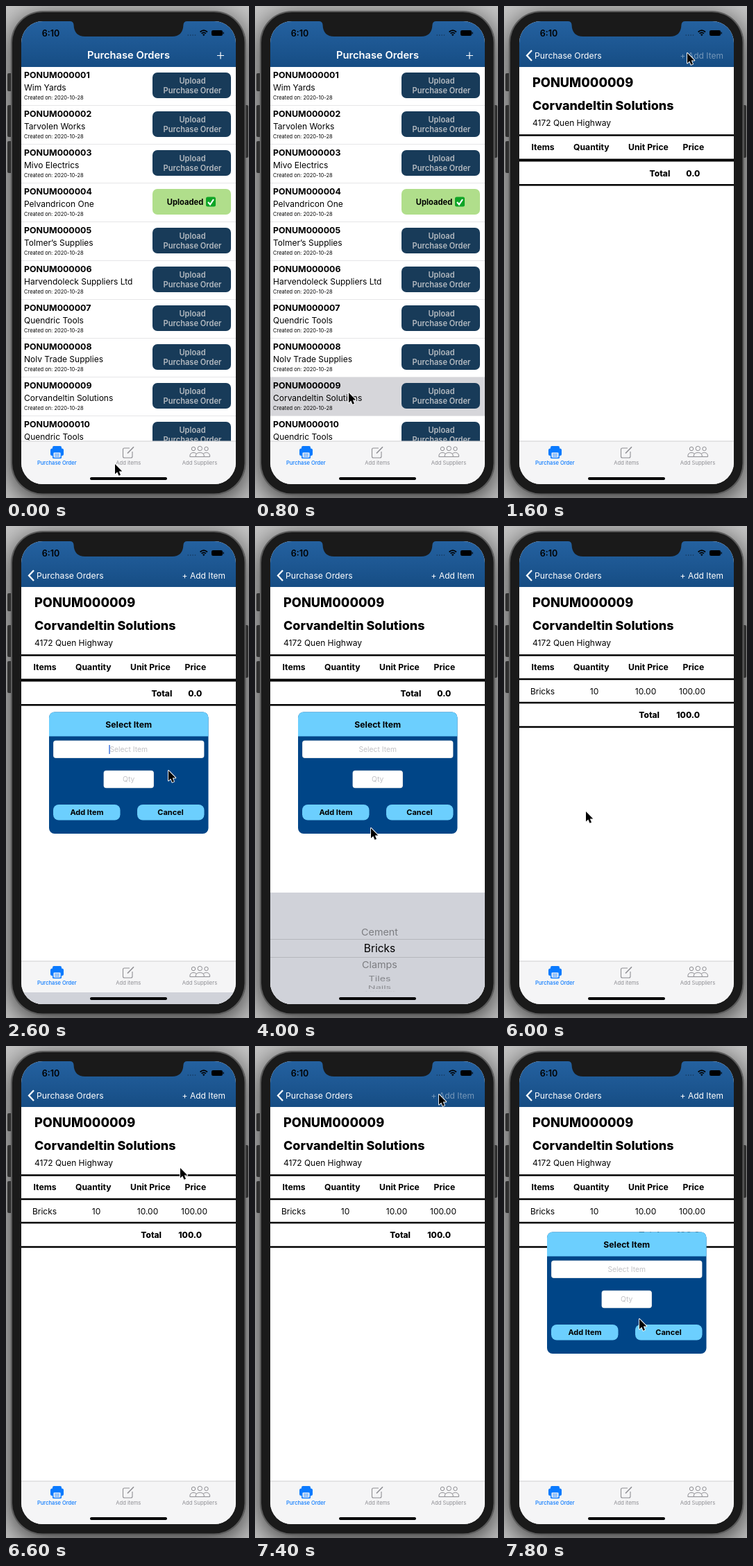
These frames come from a looping animation (350 by 710 pixels, 8 s). An HTML page with a canvas:

```html
<!DOCTYPE html>
<html lang="en">
<head>
<meta charset="utf-8">
<title>Purchase orders</title>
<style>
  html, body { margin: 0; width: 100%; height: 100%; overflow: hidden; }
  canvas { display: block; width: 350px; height: 710px; }
</style>
</head>
<body>
<canvas></canvas>
<script>
const LOOP = 8000, STEP = 200;
const NAVY = '#004587', SKY = '#6ccffe', BLUE = '#0a7aff', GRAY = '#8e8e93';
const SUPPLIERS = ['Wim Yards', 'Tarvolen Works', 'Mivo Electrics', 'Pelvandricon One', 'Tolmer’s Supplies',
  'Harvendoleck Suppliers Ltd', 'Quendric Tools', 'Nolv Trade Supplies', 'Corvandeltin Solutions', 'Quendric Tools'];
const MATERIALS = ['Cement', 'Bricks', 'Clamps', 'Tiles', 'Nails', 'Timber'];

// [time, x, y] of the pointer tip
const POINTER = [
  [0, 157, 661], [200, 152, 640], [400, 140, 590], [600, 134, 560], [1000, 136, 556],
  [1200, 190, 330], [1400, 250, 110], [1600, 264, 68], [1800, 264, 68], [2000, 258, 150],
  [2200, 235, 270], [2400, 230, 322], [2600, 234, 353], [2800, 215, 470], [3000, 195, 590],
  [3200, 184, 618], [3600, 180, 594], [3800, 180, 594], [4000, 167, 436], [4200, 172, 385],
  [4400, 178, 368], [4800, 181, 369], [5200, 181, 369], [5400, 150, 395], [5600, 118, 412],
  [6000, 118, 412], [6200, 140, 370], [6400, 195, 270], [6600, 251, 176], [6800, 262, 95],
  [7000, 265, 70], [7400, 265, 70], [7600, 245, 200], [7800, 195, 394]];

const canvas = document.querySelector('canvas');
const ctx = canvas.getContext('2d');
const ratio = window.devicePixelRatio || 1;
canvas.width = 350 * ratio;
canvas.height = 710 * ratio;

const progress = (t, from, to) => Math.min(1, Math.max(0, (t - from) / (to - from)));
const smooth = p => p * p * (3 - 2 * p);
const between = (t, from, to) => t >= from && t < to;

function rect(x, y, w, h, color, radius = 0) {
  ctx.beginPath();
  ctx.roundRect(x, y, w, h, radius);
  ctx.fillStyle = color;
  ctx.fill();
}

function text(str, x, y, size, { weight = 400, color = '#000', align = 'left' } = {}) {
  ctx.font = `${weight} ${size}px Inter, sans-serif`;
  ctx.textAlign = align;
  ctx.fillStyle = color;
  ctx.fillText(str, x, y + size * 0.363);
}

function stroke(path, color, width) {
  ctx.strokeStyle = color;
  ctx.lineWidth = width;
  ctx.stroke(new Path2D(path));
}

function group(draw, { x = 0, y = 0, alpha = 1 } = {}) {
  ctx.save();
  ctx.translate(x, y);
  ctx.globalAlpha *= alpha;
  draw();
  ctx.restore();
}

function drawPhone() {
  rect(0, 0, 350, 710, '#c6c6c6');
  ctx.save();
  ctx.shadowColor = 'rgba(0,0,0,.75)';
  ctx.shadowBlur = 38 * ratio;
  ctx.shadowOffsetY = 8 * ratio;
  rect(8, 8, 337, 697, '#222', 45);
  ctx.restore();
  for (const [x, y, h] of [[2, 97, 26], [2, 143, 46], [2, 195, 46], [342, 143, 76]])
    rect(x, y, 7, h, '#303030', 2);
  rect(7, 7, 338.5, 698.5, '#5c5c5c', 46);
  rect(9, 9, 334.5, 694.5, '#1a1a1a', 44);
}

function drawStatusBar() {
  ctx.fillStyle = '#1a1a1a';
  ctx.fill(new Path2D('M92 22 Q97 22 97.5 27 Q98 44 114 44 H239 Q255 44 255.5 27 Q256 22 261 22Z'));
  text('6:10', 64.5, 39, 12.5, { weight: 600, align: 'center' });
  for (let i = 0; i < 4; i++) rect(261.5 + i * 3.4, 41.3, 1.6, 1.6, 'rgba(0,0,0,.4)', 0.8);
  stroke('M279.6 37.5 Q284.8 32.8 290 37.5 M281.6 39.7 Q284.8 37 288 39.7', '#000', 1.7);
  ctx.fillStyle = '#000';
  ctx.fill(new Path2D('M283 41.3 Q284.8 39.9 286.6 41.3 L284.8 43.2Z'));
  rect(296, 35, 16, 8, '#000', 2.2);
  rect(312.6, 37.5, 1.2, 3, '#000', 0.5);
}

function drawNavBar(push, pressed) {
  const fill = ctx.createLinearGradient(0, 22, 0, 88);
  fill.addColorStop(0, '#2461a0');
  fill.addColorStop(1, '#164d84');
  rect(22, 22, 309, 66, fill);
  group(() => {
    text('Purchase Orders', 176.5, 71, 14.7, { weight: 600, color: '#fff', align: 'center' });
  }, { x: -85 * push, alpha: 1 - push });
  group(() => stroke('M304 71.5 h10 M309 66.5 v10', '#fff', 1.2), { alpha: 1 - push });
  group(() => {
    text('Purchase Orders', 44 + 85 * (1 - push), 71.5, 12.2, { color: '#fff' });
    stroke('M40 64 L33 71.5 L40 79', '#fff', 2.3);
    const color = pressed ? 'rgba(255,255,255,.4)' : '#fff';
    text('+ Add Item', 316, 71.5, 12, { color, align: 'right' });
  }, { alpha: push });
}

function drawList(selected) {
  rect(22, 88, 309, 540, '#fff');
  SUPPLIERS.forEach((name, i) => {
    const y = 88 + i * 56;
    if (selected && i === 8) rect(22, y, 309, 55, '#d6d6da');
    text('PONUM' + String(i + 1).padStart(6, '0'), 26, y + 11.5, 12.4, { weight: 700 });
    text(name, 26, y + 29.5, 12);
    text('Created on: 2020-10-28', 26, y + 44, 7.5);
    rect(22, y + 55, 309, 0.8, '#dedee0');
    const uploaded = i === 3;
    rect(211, y + 8, 113, 37, uploaded ? '#b0de8b' : '#183b59', 7);
    if (uploaded) {
      text('Uploaded', 258, y + 26.5, 11.2, { weight: 700, align: 'center' });
      rect(288, y + 19.5, 14, 14, '#0fa526', 2.5);
      stroke(`M291 ${y + 27} l3 3.5 l5 -7.5`, '#fff', 2.2);
    } else {
      const style = { weight: 600, color: '#b4bac0', align: 'center' };
      text('Upload', 268.5, y + 20, 11.1, style);
      text('Purchase Order', 268.5, y + 33.5, 11.1, style);
    }
  });
}

function drawDetail(hasItem) {
  const heading = { weight: 800 };
  const bold = { weight: 700 };
  const total = { weight: 800, align: 'right' };
  const centered = { align: 'center' };
  const line = (y, h = 2.4) => rect(22, y - h / 2, 309, h, '#000');
  rect(22, 88, 309, 540, '#fff');
  text('PONUM000009', 41, 110.8, 18.2, heading);
  text(SUPPLIERS[8], 41, 143.3, 17.9, heading);
  text('4172 Quen Highway', 41, 169, 12);
  line(186.5);
  text('Items', 39.5, 203.5, 12.2, bold);
  text('Quantity', 100, 203.5, 12.2, bold);
  text('Unit Price', 179, 203.5, 12.2, bold);
  text('Price', 257.5, 203.5, 12.2, bold);
  if (hasItem) {
    line(221);
    text('Bricks', 55.5, 238.5, 12, centered);
    text('10', 130, 238.5, 12, centered);
    text('10.00', 204, 238.5, 12, centered);
    text('100.00', 271, 238.5, 12, centered);
    line(255);
    text('Total', 224, 273, 12, total);
    text('100.0', 282, 273, 12, total);
    line(290);
  } else {
    line(222.5, 4);
    text('Total', 239.3, 241.2, 12, total);
    text('0.0', 282.3, 241.2, 12, total);
    line(258.2);
  }
}

function drawField(x, y, w, h, value, placeholder) {
  rect(x, y, w, h, '#c9cdd3', 4);
  rect(x + 0.5, y + 0.5, w - 1, h - 1, '#fff', 3.5);
  text(value || placeholder, 176.7, y + h / 2, 10.3, { color: value ? '#000' : '#c2c2c6', align: 'center' });
}

function drawModal({ item, quantity, caret, pressed }) {
  const centered = { weight: 700, align: 'center' };
  rect(62, 268.5, 229.5, 175.5, NAVY, 8);
  rect(62, 268.5, 229.5, 35, SKY, [8, 8, 0, 0]);
  text('Select Item', 176.7, 286.5, 12.2, centered);
  drawField(68, 309.5, 217.5, 25.5, item, 'Select Item');
  drawField(140.5, 352.8, 72.5, 25.5, quantity, 'Qty');
  if (caret === 'item') rect(148.3, 316, 1.5, 13, '#3f75dd');
  if (caret === 'quantity') rect(quantity ? 184 : 166.8, 359, 1.5, 13, '#3f75dd');
  rect(68, 402, 96.5, 22.5, SKY, 8);
  rect(189, 402, 96.5, 22.5, SKY, 8);
  text('Add Item', 116.5, 413.5, 11, { ...centered, color: pressed ? 'rgba(0,0,0,.3)' : '#000' });
  text('Cancel', 237, 413.5, 11, centered);
}

function drawTabBar() {
  rect(22, 628, 309, 62, '#f5f5f6');
  rect(22, 627.6, 309, 0.8, '#cfcfd2');
  rect(67, 635, 13, 5, BLUE, [2, 2, 0, 0]);
  rect(64, 638.5, 19, 10.5, BLUE, 2.5);
  rect(67, 643, 13, 10, BLUE, 1.5);
  rect(68.5, 644.5, 10, 7, '#f5f5f6', 0.5);
  stroke('M70 646.8 h7 M70 649.3 h7', BLUE, 1);
  stroke('M178 638 H170.5 Q168.5 638 168.5 640 V650 Q168.500 652 170.5 652 H180 Q182 652 182 650 V643', GRAY, 1.1);
  stroke('M175 645.5 L184 636.3', GRAY, 1.6);
  for (const [x, y, s] of [[270, 639, 0.85], [288.5, 639, 0.85], [279.3, 638.5, 1]]) {
    const body = new Path2D(`M${x - 6 * s} 650.5 Q${x - 6.5 * s} 644.5 ${x} 644.5 Q${x + 6.5 * s} 644.5 ${x + 6 * s} 650.5 Z`);
    ctx.fillStyle = '#f5f5f6';
    ctx.strokeStyle = GRAY;
    ctx.lineWidth = 1;
    ctx.fill(body);
    ctx.stroke(body);
    ctx.beginPath();
    ctx.arc(x, y, 3.2 * s, 0, 7);
    ctx.fill();
    ctx.stroke();
  }
  text('Purchase Order', 73.3, 659.3, 7.6, { weight: 500, color: BLUE, align: 'center' });
  text('Add items', 176.3, 659.3, 7.6, { color: GRAY, align: 'center' });
  text('Add Suppliers', 279, 659.3, 7.6, { color: GRAY, align: 'center' });
}

// Wheel rows lie on a cylinder seen from the front.
function drawPicker(selection) {
  const radius = 62, angle = 0.388;
  rect(22, 529, 309, 161, '#d0d2d9');
  MATERIALS.forEach((name, i) => {
    const offset = i - selection, turn = offset * angle;
    if (Math.abs(turn) >= Math.PI / 2) return;
    const near = Math.max(0, 1 - Math.abs(offset));
    ctx.save();
    ctx.translate(179.5, 609.5 + radius * Math.sin(turn));
    ctx.scale(1, Math.cos(turn));
    ctx.globalAlpha = near > 0.5 ? 1 : 0.45 - Math.abs(offset) * 0.04;
    text(name, 0, 0, 14.3 + 1.2 * near, { align: 'center' });
    ctx.restore();
  });
  rect(22, 596, 309, 0.8, '#acaeb4');
  rect(22, 622.3, 309, 0.8, '#acaeb4');
}

function drawPointer(t) {
  const next = POINTER.findIndex(key => key[0] > t);
  const end = POINTER.at(next), start = next < 0 ? end : POINTER[next - 1];
  const p = next < 0 ? 0 : progress(t, start[0], end[0]);
  group(() => {
    const arrow = new Path2D('M0 0 V14.5 L3.3 11.5 L5.5 16.8 L8 15.7 L5.8 10.5 H10.3 Z');
    ctx.lineJoin = 'round';
    ctx.strokeStyle = '#fff';
    ctx.lineWidth = 1.8;
    ctx.stroke(arrow);
    ctx.fillStyle = '#000';
    ctx.fill(arrow);
  }, { x: start[1] + (end[1] - start[1]) * p, y: start[2] + (end[2] - start[2]) * p });
}

function caretAt(t) {
  if (between(t, 2400, 3800)) return Math.floor((t - 2400) / 600) % 2 ? '' : 'item';
  if (between(t, 4400, 5600)) return 'quantity';
  return '';
}

function render(t) {
  const push = smooth(progress(t, 900, 1400));
  const rise = 1 - (1 - progress(t, 2577, 3000)) ** 2;
  const pickerY = 161 * (1 - rise) + 161 * smooth(progress(t, 4400, 4750));

  ctx.setTransform(ratio, 0, 0, ratio, 0, 0);
  drawPhone();
  ctx.save();
  ctx.beginPath();
  ctx.roundRect(22, 22, 309, 668, 31);
  ctx.clip();
  rect(22, 22, 309, 668, '#fff');
  if (push < 1) group(() => drawList(between(t, 600, 1400)), { x: -100 * push });
  if (push > 0) group(() => drawDetail(t >= 6000), { x: 309 * (1 - push) });
  drawNavBar(push, between(t, 1600, 2000) || between(t, 7400, 7600));
  drawStatusBar();
  if (between(t, 2000, 6000) || t >= 7600) {
    const filling = between(t, 4400, 6000);
    drawModal({
      item: filling ? 'Bricks' : '',
      quantity: filling ? '10'.slice(0, Math.max(0, (t - 5000) / STEP)) : '',
      caret: caretAt(t),
      pressed: t === 5800,
    });
  }
  drawTabBar();
  if (pickerY < 161) group(() => drawPicker(smooth(progress(t, 3100, 3600))), { y: pickerY });
  rect(121, 680, 111, 4, between(t, 4600, 5200) ? '#777' : '#000', 2);
  ctx.restore();
  drawPointer(t);
}

function tick(now) {
  render(Math.floor((now % LOOP) / STEP) * STEP);
  requestAnimationFrame(tick);
}
requestAnimationFrame(tick);
</script>
</body>
</html>
```
